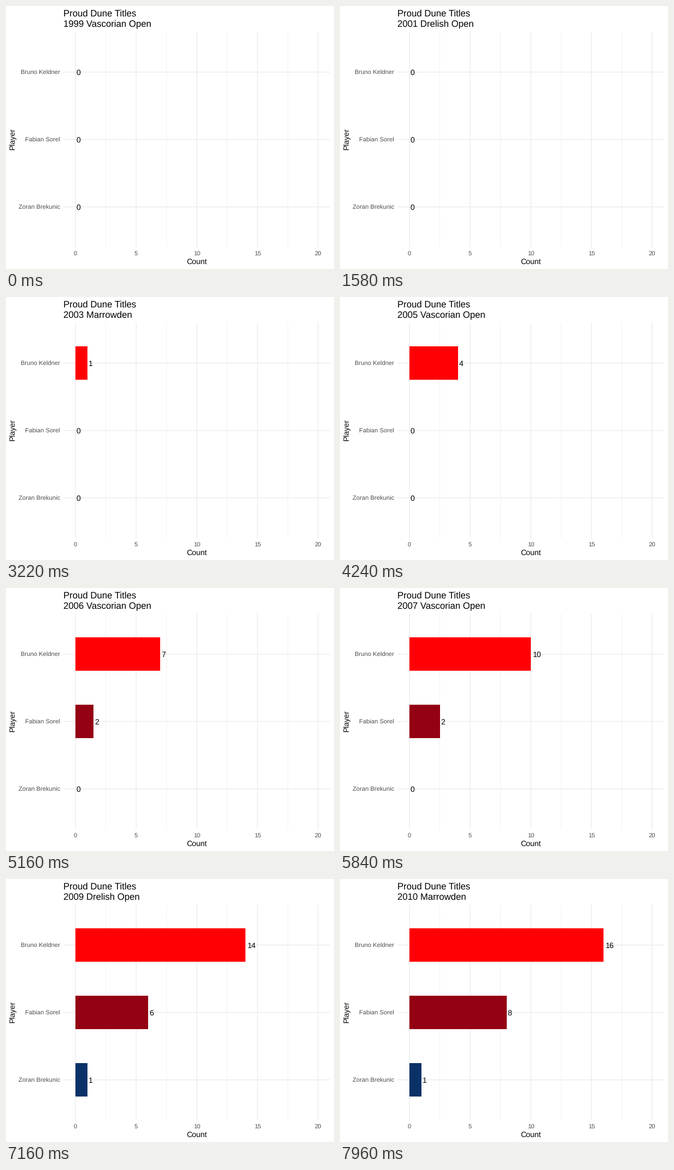
Animation of 600x480 px, one loop 8000 ms. Source, as a matplotlib script:

```python
import matplotlib.pyplot as plt
from matplotlib.animation import FuncAnimation

plt.rcParams["font.family"] = ["Liberation Sans", "DejaVu Sans"]
plt.rcParams["text.hinting"] = "none"

WIDTH, HEIGHT, DPI = 600, 480, 100
INTERVAL, FRAMES = 20, 400
LEFT, RIGHT, TOP, BOTTOM = 105, 593, 46.8, 440.4
UNIT = (RIGHT - LEFT) / 22
ZERO = LEFT + UNIT
ROW = (BOTTOM - TOP) / 3.2
BAR_HEIGHT = ROW / 2
GRID = "#EBEBEB"
DIGIT = 0.556 * 14

EVENTS = ["Vascorian Open", "Drelish Open", "Marrowden", "KV Open"]
FIRST_YEAR = 1999

# Name, bar colour, and the events won (counted from the first one).
PLAYERS = [
    ("Bruno Keldner", "#FF0005",
     [18, 20, 22, 23, 26, 27, 28, 30, 31, 32, 34, 35, 39, 41, 42, 44]),
    ("Fabian Sorel", "#940014", [25, 29, 33, 37, 38, 40, 45, 46]),
    ("Zoran Brekunic", "#0A3168", [36]),
]
LAST_EVENT = 46
FIRST_WIN = 18
WON = {event for _, _, wins in PLAYERS for event in wins}


def is_pause(event):
    """An event without a win, once the first win is in."""
    return event > FIRST_WIN and event not in WON


def switch_frame(event):
    """Frame just past the middle of the move to an event."""
    return 9 * event - 2 if event <= 31 else 277 + 8 * (event - 31)


def title_frame(event):
    return switch_frame(event) - (2 if is_pause(event) else 0)


def ease(t):
    return 2 * t * t if t < 0.5 else 1 - 2 * (1 - t) ** 2


def progress(event, frame):
    t = min(max((frame - switch_frame(event) + 3) / 4, 0), 1)
    # After a pause the first small step comes early and holds.
    if is_pause(event - 1) and frame > switch_frame(event - 1):
        t = max(t, 0.25)
    return ease(t)


def event_title(event):
    year, index = divmod(event, 4)
    return f"{FIRST_YEAR + year} {EVENTS[index]}"


fig = plt.figure(figsize=(WIDTH / DPI, HEIGHT / DPI), dpi=DPI, facecolor="white")
ax = fig.add_axes([0, 0, 1, 1])
ax.set_xlim(0, WIDTH)
ax.set_ylim(HEIGHT, 0)
ax.axis("off")


def text(x, y, label, size, color="black", **kwargs):
    return ax.text(x, y, label, fontsize=size * 72 / DPI, color=color,
                   va="baseline", **kwargs)


def grid_line(xs, ys, width):
    ax.plot(xs, ys, color=GRID, lw=width * 72 / DPI, snap=False,
            solid_capstyle="butt", zorder=1)


def count_x(count):
    return ZERO + count * UNIT


def label_x(count, shown):
    return count_x(count) + 0.3 * DIGIT * len(shown) - 0.6


def row_y(row):
    return TOP + (0.6 + row) * ROW


for count in (2.5, 7.5, 12.5, 17.5):
    grid_line([count_x(count)] * 2, [TOP, BOTTOM], 0.68)
for row in range(3):
    grid_line([LEFT, RIGHT], [row_y(row)] * 2, 1.36)
for count in range(0, 21, 5):
    grid_line([count_x(count)] * 2, [TOP, BOTTOM], 1.36)
    text(count_x(count), 455, str(count), 11.2, "#4D4D4D", ha="center")

text(LEFT, 19.3, "Proud Dune Titles", 16.8)
title = text(LEFT, 37.4, "", 16.8)
text((LEFT + RIGHT) / 2, 471, "Count", 14, ha="center")
text(16.4, (TOP + BOTTOM) / 2 - 1, "Player", 14, rotation=90,
     rotation_mode="anchor", ha="center")

bars, labels = [], []
for row, (name, color, _) in enumerate(PLAYERS):
    y = row_y(row)
    text(99, y + 4.2, name, 11.2, "#4D4D4D", ha="right")
    bars.append(ax.add_patch(plt.Rectangle(
        (ZERO, y - BAR_HEIGHT / 2), 0, BAR_HEIGHT, fc=color, lw=0, zorder=2)))
    labels.append(text(label_x(0, "0"), y + 5.4, "0", 14, zorder=3))


def update(frame):
    current = max((e for e in range(1, LAST_EVENT + 1) if frame >= title_frame(e)),
                  default=0)
    title.set_text(event_title(current))
    for (_, _, wins), bar, label in zip(PLAYERS, bars, labels):
        count = sum(progress(event, frame) for event in wins)
        shown = str(round(count))
        bar.set_width(count * UNIT)
        label.set_text(shown)
        label.set_x(label_x(count, shown))
    return [title, *bars, *labels]


animation = FuncAnimation(fig, update, frames=FRAMES, interval=INTERVAL,
                          repeat=True, repeat_delay=0)
plt.show()
```
